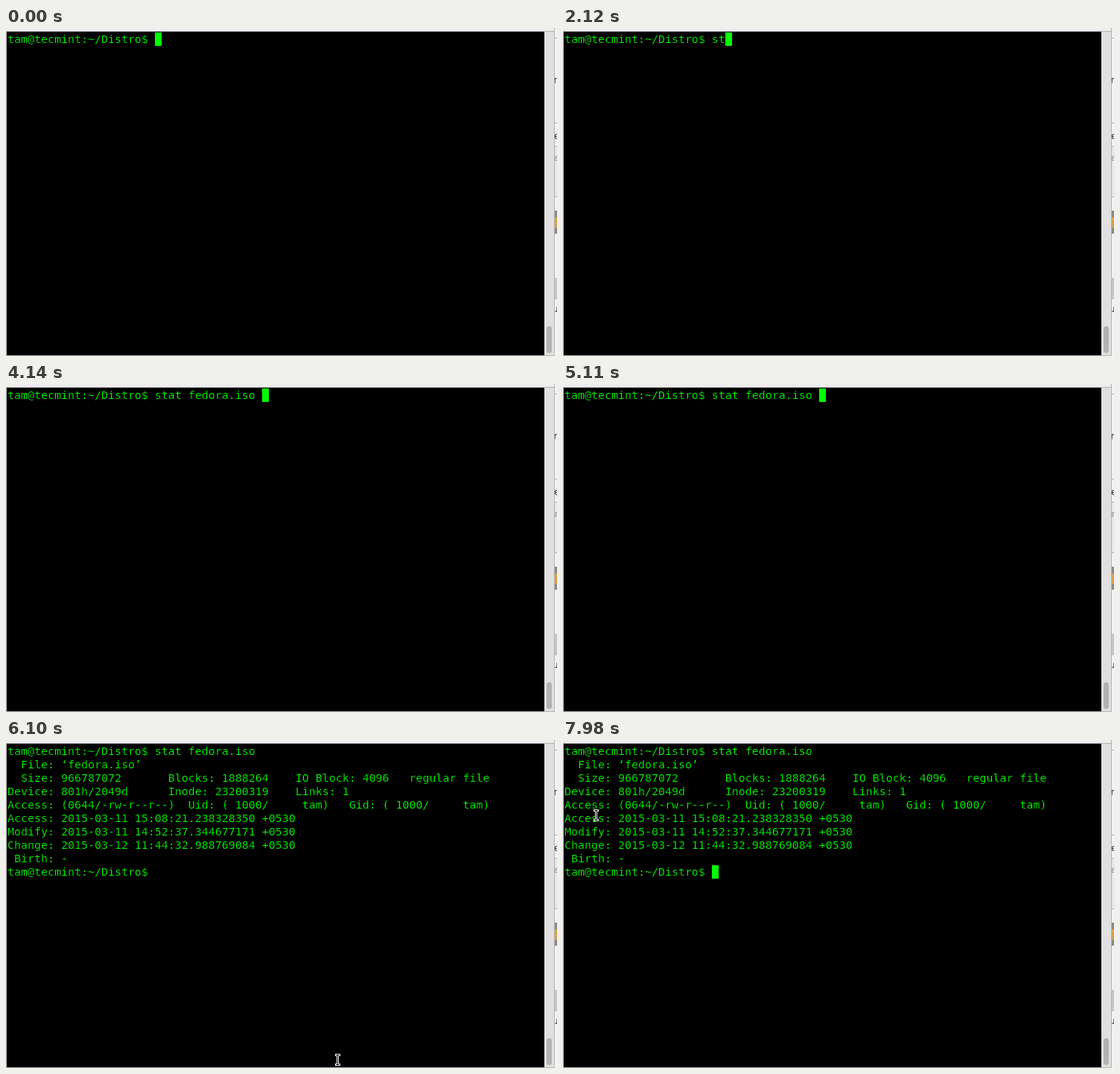
These frames come from a looping animation (740x440 px, 8 s). An HTML page:

```html
<!DOCTYPE html>
<html lang="en">
<head>
<meta charset="utf-8">
<title>Terminal: stat</title>
<style>
  html, body { margin: 0; width: 100%; height: 100%; overflow: hidden; background: #f0f0f0; }
  #stage { position: absolute; left: 0; top: 0; width: 740px; height: 440px; overflow: hidden; }
  #stage > * { position: absolute; }
  #screen {
    left: 2px; top: 6px; margin: 0; color: #0f0;
    font: 14.95px/18px "DejaVu Sans Mono", monospace;
    -webkit-text-stroke: .2px #000; /* thins the strokes */
  }
  #caret { width: 9px; height: 18px; background: #0f0; }
  #pointer { width: 9px; height: 18px; }
  svg { display: block; left: 0; top: 0; }
</style>
</head>
<body>
<div id="stage">
  <svg width="740" height="440" shape-rendering="crispEdges">
    <!-- slice of the page behind the window -->
    <rect x="737" width="3" height="440" fill="#f2f2f2"/>
    <path d="M737 13.5h3m-3 114h3m-3 31h3m-3 68h3" stroke="#b0b0b0"/>
    <rect x="737" y="159" width="3" height="67" fill="#e6e6e6"/>
    <g font-family="DejaVu Sans, sans-serif" font-size="12" fill="#222">
      <text x="735.5" y="74">r</text>
      <text x="736" y="149">e</text>
      <text x="736" y="178" font-size="10" fill="#777">a</text>
      <text x="734" y="295">:</text>
      <text x="734" y="381">u</text>
    </g>
    <rect x="737" y="245" width="3" height="31" fill="#8c8a86"/>
    <rect x="737" y="254" width="3" height="14" fill="#d9a04a"/>
    <rect x="737" y="335" width="3" height="29" fill="#c3c6cc"/>
    <!-- window -->
    <rect width="737" height="440" fill="#b4b4b4"/>
    <rect width="736" height="4" fill="#ededed"/>
    <rect x="1" y="5" width="722" height="434" fill="#000"/>
    <rect x="723" y="5" width="13" height="434" fill="#e0e0e0"/>
    <rect x="726" y="400" width="7" height="36" rx="3.5" fill="#b2b2b2" shape-rendering="auto"/>
  </svg>
  <pre id="screen"></pre>
  <div id="caret"></div>
  <svg id="pointer" viewBox="-4.5 -9 9 18" fill="none" stroke-linecap="square">
    <path id="beam" d="M-2 -6.5H2M-2 6.5H2M0 -6.5V6.5" stroke="#fff" stroke-width="3"/>
    <use href="#beam" stroke="#000"/>
    <path d="M-2 -6.5H2M-2 6.5H2M0 -6.5V6.5" stroke="#000"/>
  </svg>
</div>
<script>
const LOOP = 8000, BLINK = 592, POINTER_STEP = 40;
const FIRST_PRESS = 1960, ENTER = 5110, OUTPUT_AT = 5160;
const USER = "tam";
const PROMPT = USER + "@tecmint:~/Distro$ ";
const OUTPUT = `
  File: ‘fedora.iso’
  Size: 966787072       Blocks: 1888264    IO Block: 4096   regular file
Device: 801h/2049d      Inode: 23200319    Links: 1
Access: (0644/-rw-r--r--)  Uid: ( 1000/     ${USER})   Gid: ( 1000/     ${USER})
Access: 2015-03-11 15:08:21.238328350 +0530
Modify: 2015-03-11 14:52:37.344677171 +0530
Change: 2015-03-12 11:44:32.988769084 +0530
 Birth: -
`;

// Characters typed at an even pace; the last burst is tab completion.
const burst = (start, gap, text) =>
  [...text].map((char, i) => ({ char, time: start + i * gap }));
const keys = [
  ...burst(2000, 120, "st"),
  ...burst(2650, 322, "at fe"),
  ...burst(4140, 0, "dora.iso "),
];

// The caret is lit for one BLINK after each of these, then alternates.
const caretResets = [-182, FIRST_PRESS, ...keys.map(key => key.time), ENTER];

const linear = p => p;
const easeIn = p => p * p;
const easeOut = p => 1 - (1 - p) ** 3.3;
const entry = { x: 661, y: 435 }, rest = { x: 439.5, y: 426 };
const turn = { x: 121.5, y: 156 }, end = { x: 44.5, y: 101 };
const glides = [
  { start: 6020, steps: 3, from: entry, to: rest, easeX: easeOut, easeY: linear },
  { start: 7440, steps: 6, from: rest, to: turn, easeX: linear, easeY: easeIn },
  { start: 7820, steps: 4, from: turn, to: end, easeX: linear, easeY: linear },
];

const [screenText, caret, pointer] =
  ["screen", "caret", "pointer"].map(id => document.getElementById(id));

function place(element, x, y, visible) {
  element.style.left = x + "px";
  element.style.top = y + "px";
  element.style.visibility = visible ? "visible" : "hidden";
}

function drawPointer(time) {
  const glide = glides.findLast(g => g.start <= time);
  if (!glide) return place(pointer, 0, 0, false);
  const { start, steps, from, to, easeX, easeY } = glide;
  const progress = Math.min(1, Math.floor((time - start) / POINTER_STEP) / steps);
  const x = from.x + (to.x - from.x) * easeX(progress);
  const y = from.y + (to.y - from.y) * easeY(progress);
  place(pointer, Math.floor(x) - 4, Math.round(y) - 9, true);
}

function render(time) {
  const done = time >= OUTPUT_AT;
  const typed = keys.filter(key => key.time <= time).map(key => key.char).join("");
  const text = PROMPT + typed + (done ? OUTPUT + PROMPT : "");
  if (screenText.textContent !== text) screenText.textContent = text;

  const column = PROMPT.length + (done ? 0 : typed.length);
  const lastReset = caretResets.findLast(t => t <= time);
  const caretOn = Math.floor((time - lastReset) / BLINK) % 2 === 0;
  place(caret, 2 + 9 * column, done ? 168 : 6, caretOn);

  drawPointer(time);
}

const began = performance.now();
function tick() {
  render((performance.now() - began) % LOOP);
  requestAnimationFrame(tick);
}
tick();
</script>
</body>
</html>
```
